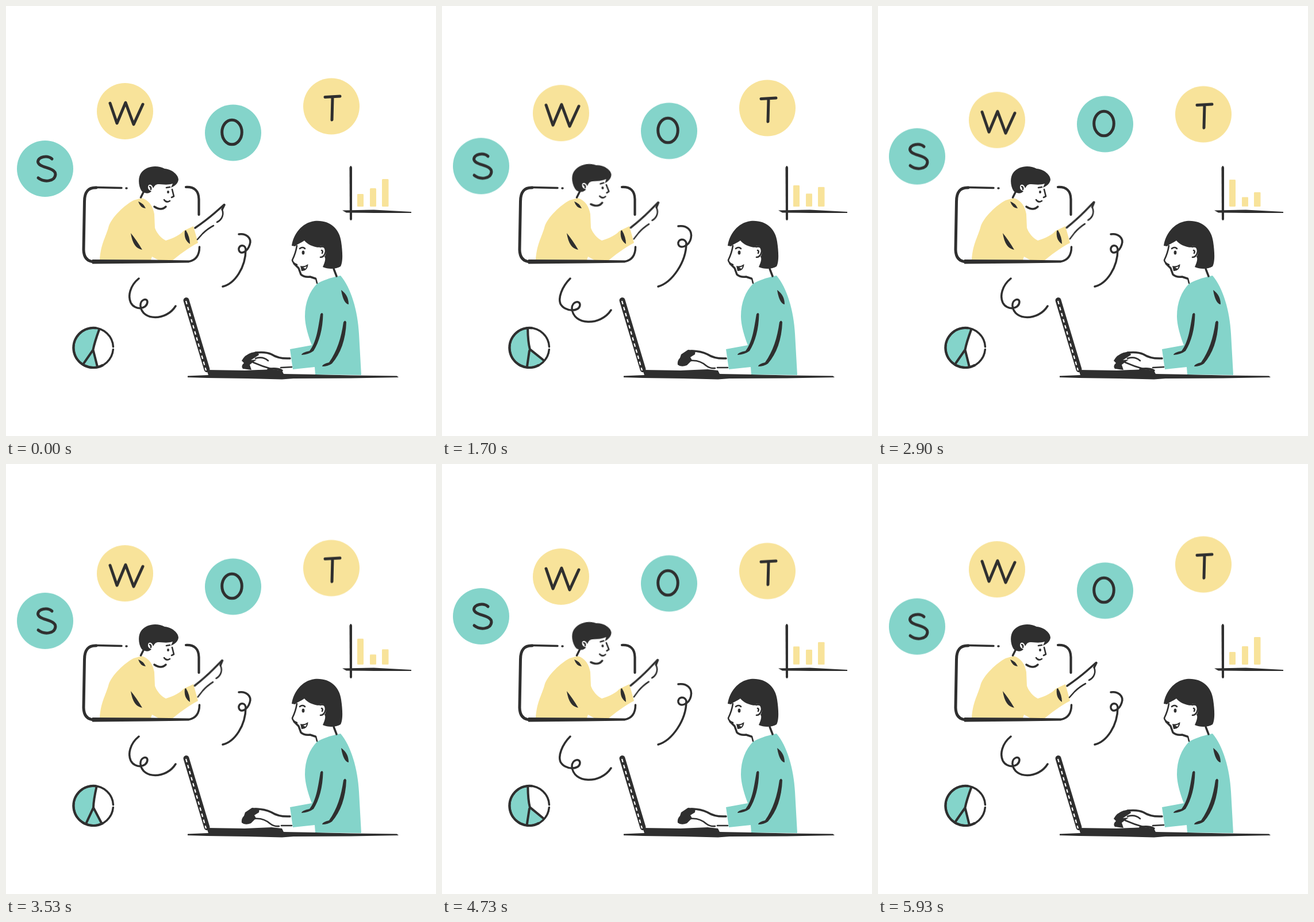
These frames come from a looping animation (748 by 748 pixels, 6.01 s). An HTML page:

```html
<!DOCTYPE html>
<html lang="en">
<head>
<meta charset="utf-8">
<title>SWOT meeting</title>
<style>
  :root {
    --ink: #2f2f2f;
    --teal: #84d4ca;
    --yellow: #f8e39a;
    --loop: 6010ms;
    --sine: cubic-bezier(.364, 0, .636, 1);
  }
  html, body { margin: 0; width: 100%; height: 100%; overflow: hidden; background: #fff; }
  svg { display: block; width: 100%; height: 100%; }

  .line { fill: none; stroke: var(--ink); stroke-width: 3.5; stroke-linecap: round; stroke-linejoin: round; }
  .thin { stroke-width: 2.6; }
  .bold { stroke-width: 5; }
  .ink { fill: var(--ink); }
  .teal { fill: var(--teal); }
  .yellow { fill: var(--yellow); }
  .white { fill: #fff; }

  /* Floating letters: three bobs per loop */
  .disc { animation: bob calc(var(--loop) / 6) var(--sine) infinite alternate; }
  @keyframes bob { to { transform: translateY(var(--rise)); } }

  /* Bar chart: one swing per loop */
  .bar { transform-origin: 0 349px; animation: grow calc(var(--loop) / 2) var(--sine) infinite alternate; }
  @keyframes grow { from { transform: scaleY(var(--from)); } to { transform: scaleY(var(--to)); } }

  /* Pie: two swings per loop */
  .pie { animation: calc(var(--loop) / 4) var(--sine) -75ms infinite alternate; }
  .slice { animation-name: slice; }
  .cuts { animation-name: cuts; }
  @keyframes slice {
    from { d: path("M151.5 598 L162.5 562 L200 550 L200 640 L159 629 Z"); }
    to   { d: path("M153 597 L148 559 L200 550 L200 632 L178 615 Z"); }
  }
  @keyframes cuts {
    from { d: path("M162.5 562 Q154 585 151.5 598 L159 628 M151.5 598 L135.5 621"); }
    to   { d: path("M148 561 Q149 584 153 597 L178 615 M152 600 L149 628"); }
  }

  .head { transform-origin: 225px 340px; animation: nod calc(var(--loop) / 2) step-end infinite; }
  @keyframes nod {
    0%, 64% { transform: none; }
    35% { transform: rotate(-7.3deg); }
  }

  .arm { transform-origin: 322px 395px; animation: point var(--loop) ease-in-out infinite; }
  @keyframes point {
    0%, 98.7%, 100% { transform: none; }
    18.8% { transform: rotate(-3deg); }
    38.3% { transform: rotate(-5deg); }
    58.7% { transform: rotate(-4deg); }
    68.7% { transform: rotate(-13.7deg); }
    78.7% { transform: rotate(-5deg); }
  }

  .swirl { animation: var(--loop) linear infinite both; }
  .upper { animation-name: upper; }
  .lower { animation-name: lower; animation-delay: 36ms; }
  @keyframes upper {
    0%, 16.9%, 32.5%, 68%, 81%, 100% {
      d: path("M405 397 C418 395 428 404 424 415 C420 428 407 434 405 424 C404 415 416 414 417 423 C417 455 398 483 377 488");
    }
    17.8%, 31%, 69.3%, 79.5% {
      d: path("M411 383 C426 381 436 390 433 404 C430 418 413 424 411 414 C410 405 422 403 425 412 C425 446 400 481 376 488");
    }
  }
  @keyframes lower {
    0%, 16.9%, 32.5%, 68%, 81%, 100% {
      d: path("M231 474 C215 487 212 505 217 516 C224 530 245 528 246 515 C246 507 233 510 234 522 C237 548 279 548 295 522");
    }
    17.8%, 31%, 69.3%, 79.5% {
      d: path("M223 474 C208 489 202 508 206 518 C213 532 239 533 240 520 C240 511 226 514 226 526 C228 556 276 557 294 529");
    }
  }

  /* Typing: sixteen taps per loop */
  .tap { animation: calc(var(--loop) / 16) step-end infinite; }
  .down { animation-name: down; }
  .up { animation-name: up; }
  @keyframes down { 0%, 65% { opacity: 1; } 10% { opacity: 0; } }
  @keyframes up { 0%, 65% { opacity: 0; } 10% { opacity: 1; } }
</style>
</head>
<body>
<svg viewBox="0 0 748 748" role="img" aria-label="S W O T: two people in a video meeting">
  <defs>
    <clipPath id="pieClip"><circle cx="152" cy="594.5" r="35"/></clipPath>
  </defs>

  <!-- Letters -->
  <g class="disc" style="--rise:-22px">
    <circle class="teal" cx="68" cy="283" r="49"/>
    <path class="line bold" d="M80 266 C72 259 56 262 55.5 271 C56 282 86 280 86 293 C85 306 66 307 56 299"/>
  </g>
  <g class="disc" style="--rise:15.7px">
    <circle class="yellow" cx="207" cy="183" r="49"/>
    <path class="line bold" d="M181 169 L193 204 L208 168 L222 206 L238 171"/>
  </g>
  <g class="disc" style="--rise:-15.5px">
    <circle class="teal" cx="395" cy="220.5" r="49"/>
    <ellipse class="line bold" cx="393" cy="219.5" rx="17.3" ry="21.3"/>
  </g>
  <g class="disc" style="--rise:14.2px">
    <circle class="yellow" cx="566" cy="174.5" r="49"/>
    <path class="line bold" d="M555 158.5 L581 157 M568 159 L567 198"/>
  </g>

  <!-- Bar chart -->
  <g class="yellow">
    <rect class="bar" x="611" y="302" width="11" height="47" rx="1.5" style="--from:.468;--to:1"/>
    <rect class="bar" x="633" y="317" width="11" height="32" rx="1.5" style="--from:1;--to:.515"/>
    <rect class="bar" x="654" y="301" width="11.5" height="48" rx="1.5" style="--from:1;--to:.52"/>
  </g>
  <path class="ink" d="M597.5 281 Q600 275 602 281 L602 371 Q600 375 598 371 Z"/>
  <path class="ink" d="M585 355.5 L640 354.5 L705 358 L705 360 L640 360 L592 359.5 Z"/>

  <!-- Pie -->
  <circle class="teal" cx="152" cy="594.5" r="35"/>
  <g clip-path="url(#pieClip)">
    <path class="pie slice white" d="M151.5 598 L162.5 562 L200 550 L200 640 L159 629 Z"/>
  </g>
  <path class="pie cuts line" style="stroke-width:4" d="M162.5 562 Q154 585 151.5 598 L159 628 M151.5 598 L135.5 621"/>
  <circle class="line" cx="152" cy="594.5" r="34.5" pathLength="360" stroke-dasharray="352 8" stroke-dashoffset="-5"/>
  <path class="line" style="stroke-width:4.3" d="M156 560.2 A34.5 34.5 0 1 0 168 625"/>

  <!-- Caller on the screen -->
  <path class="yellow" d="M163 441 C165 415 172 405 178 386 C182 368 208 345 222 338 L236 334 C250 338 256 350 258 362 L259 386 C262 395 270 404 278 408 C292 404 304 397 309 391 L326 383 L334 412 C318 420 300 434 289 443 L265 442 L254 436 L252 442 Z"/>
  <path class="line bold" d="M157 316 Q136.5 315 136.5 340 L135 424 Q135.5 444 153 445"/>
  <path class="line" d="M157 315.5 L201 316.5 M209 317 L210 317"/>
  <path class="ink" d="M150 441 L250 441.5 L318 442.5 L318 446.5 L250 447.5 L150 448.5 Z"/>
  <path class="line" d="M318 444.5 Q336.5 441 336.5 419"/>
  <path class="line" style="stroke-width:4.2" d="M313 315 Q335 314 335.5 336 L335.5 363"/>
  <path class="ink" d="M217 395 Q227 407 237 424 Q221 422 217 395 Z M230 340 Q239 343 243 352 Q234 352 230 340 Z"/>
  <path class="ink" d="M313 390 Q320 402 320 414 Q309 407 311 391 Z"/>

  <g class="arm">
    <path class="white" d="M328 386 L381 345 L378 365 L364 377 L333 405 Z"/>
    <path class="line" d="M329 386 Q348 373 363 360 L379.5 345.5"/>
    <path class="line" d="M380 346 L376 354"/>
    <path class="line thin" d="M376 354 Q379 362 375 369 Q372 374 367 376 M361 382 Q350 388 342 396 L333 406"/>
  </g>

  <path class="line" d="M240 322 L234.5 333"/>
  <g class="head">
    <path class="ink" d="M236 322 C230 313 229 297 236 289 C245 278 263 276 276 283 C289 284 300 294 300 302 C299 309 294 313 287 316 L290 309 C282 312 270 310 264 310 C259 311 258 314 256 317 C254 309 247 309 247 315 C247 319 250 321 253 322 C249 327 243 327 236 322 Z"/>
    <path class="line thin" d="M250 314 Q253 315 252 319"/>
    <path class="line thin" d="M289 319 L292 331 L288 333 M275 337 Q279 343 285 339 M279 316 L285 315"/>
    <ellipse class="ink" cx="282" cy="323.5" rx="2" ry="2.6"/>
    <path class="line" d="M258 349 Q270 357 278 349"/>
  </g>

  <!-- Swirls -->
  <path class="swirl upper line" d="M405 397 C418 395 428 404 424 415 C420 428 407 434 405 424 C404 415 416 414 417 423 C417 455 398 483 377 488"/>
  <path class="swirl lower line" d="M231 474 C215 487 212 505 217 516 C224 530 245 528 246 515 C246 507 233 510 234 522 C237 548 279 548 295 522"/>

  <!-- Laptop and table -->
  <path class="line" style="stroke-width:10" d="M313.5 512 L349.5 632"/>
  <path class="line" style="stroke:#fff;stroke-width:2.2;stroke-dasharray:6 5;stroke-linecap:butt" d="M313 513 L348 634"/>
  <path class="ink" d="M349 633 L415 634 L462 632 L480 634 L483 640 L538 641 L600 642.5 L680 643.5 L683 646 L600 647.5 L500 648 L480 649.5 L420 648 L350 647 L316 646 L316 643.5 L352 642 Z"/>

  <!-- Woman at the laptop -->
  <path class="teal" d="M541 483 C550 478 562 473 582 469 C600 490 612 530 614 570 L618 642 L538 641 L537 628 L499 632 L494 597 L532 590 C526 575 520 555 520 540 C520 515 528 497 541 483 Z"/>
  <g class="ink">
    <path d="M583 494 Q596 503 596 519 Q587 518 583 494 Z"/>
    <path d="M547 536 Q550 532 551.5 536 C551 562 545 584 535 600 Q527 606 514 607 Q514 603 528 600 C540 585 543 560 547 536 Z"/>
    <path d="M587 550 Q590 545 592 550 C591 580 582 605 567 622 Q560 627 550 627 Q550 623 562 620 C576 600 583 578 587 550 Z"/>
    <path d="M497 417 C500 397 514 377 537 374 C563 372 580 387 583 410 C586 430 586 446 582 453 C574 458 560 458 551 454 C554 447 557 440 554 436 C559 430 556 417 550 417 C546 417 545 419 544 420 C533 419 524 414 519 408 C512 413 505 415 503 418 Z"/>
    <ellipse cx="517" cy="429" rx="2.4" ry="3.4"/>
    <path d="M512 452 Q519 454 525.5 449 Q525 461 514 461 Z"/>
  </g>
  <path class="line thin" d="M546 419 Q556 416 556 427 Q554 437 547 437 M549 425 Q552 426 550 430"/>
  <path class="line thin" d="M506 417 Q504 430 498 442 Q499 448 506 450 M511 422 Q516 418 520 422"/>
  <path class="line" d="M501 448 L509 456 L513 467 Q518 472 529 471 L538 474 M570 457 L575 470"/>
  <path class="line thin" d="M539 474 L541 482"/>
  <path class="white" d="M517 455 L523 453 L521 457 Z"/>

  <!-- Hands -->
  <g class="tap down">
    <path class="white" d="M494 612 L469 611 L455 603 L432 602 L412 624 L420 633 L460 632 L498 630 Z"/>
    <path class="line" d="M494 613 Q474 614 462 606 Q452 601 434 603 L418 612"/>
    <path class="ink" d="M427 603 L438 601 L440 607 L426 616 L436 615 L424 624 L427 633 L412 631 Q408 626 414 621 L410 617 Q415 607 427 603 Z"/>
    <path class="line thin" d="M434 613 Q447 609 456 617 M430 620 Q446 627 461 631 M478 629 L497 628"/>
    <path class="line" d="M456 632 Q470 629 480 634"/>
  </g>
  <g class="tap up">
    <path class="white" d="M494 612 L469 611 L455 603 L432 600 L412 615 L415 626 L460 630 L498 630 Z"/>
    <path class="line" d="M494 613 Q474 614 462 606 Q450 600 434 600"/>
    <path class="ink" d="M428 598 L441 599 L440 606 L432 611 L435 616 L426 625 Q416 629 410 624 Q409 617 414 612 L416 606 Z"/>
    <path class="line thin" d="M431 617 Q448 615 460 626 Q467 631 475 630 M479 629 L497 629"/>
  </g>
</svg>
</body>
</html>
```
